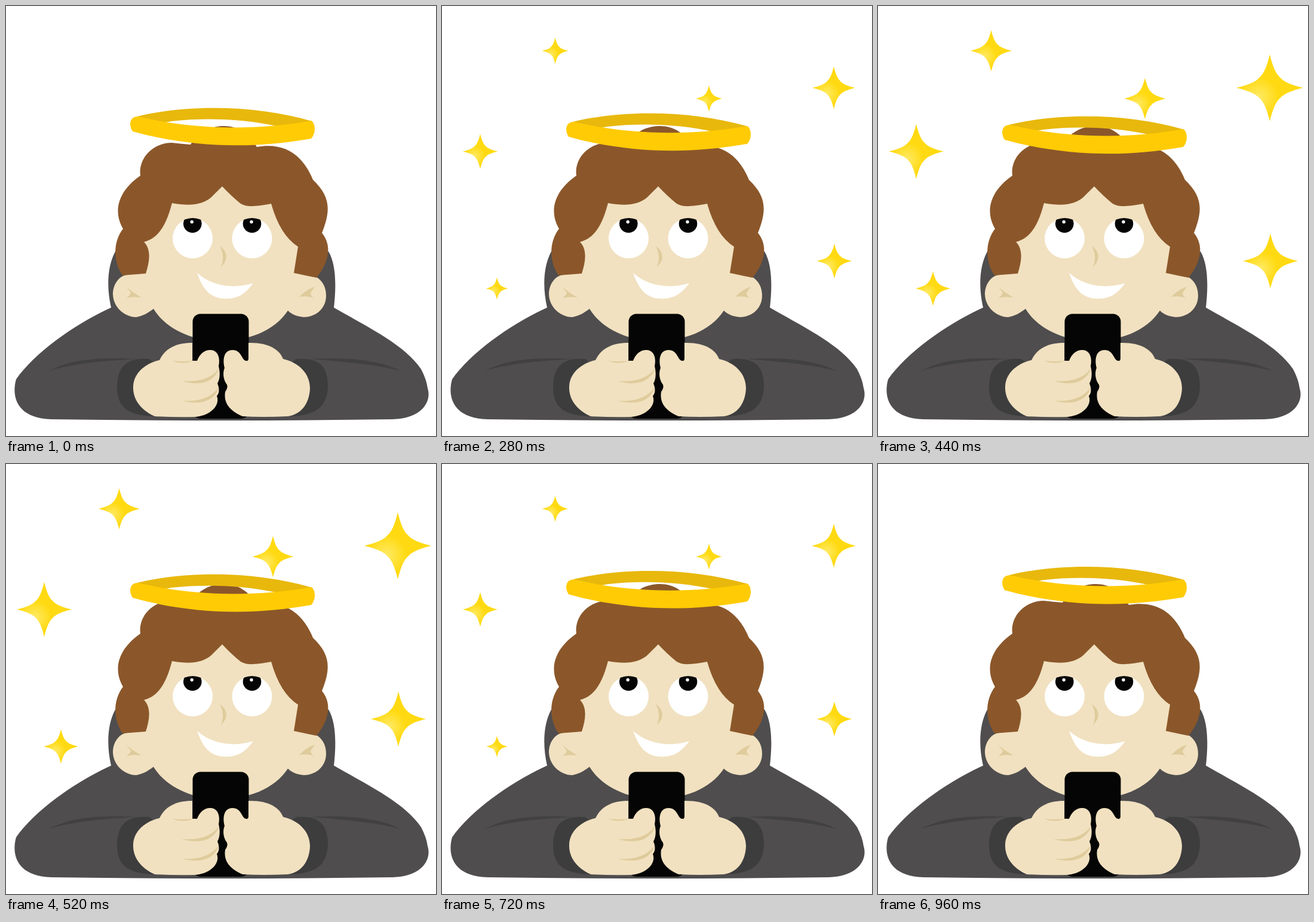
Animation, 720 px wide and 720 px high, one loop 1 s. Source, as an HTML page:

```html
<!DOCTYPE html>
<html lang="en">
<head>
<meta charset="utf-8">
<title>Halo</title>
<style>
  html, body { margin: 0; width: 100%; height: 100%; overflow: hidden; background: #fff; }
  svg { display: block; width: 100%; height: 100%; }
  .hair { fill: #8b572a; }
  .skin { fill: #f1e1c0; }
  .line { fill: #dfcb9b; }
  .coat { fill: #4f4d4e; }
  .fold { fill: #414141; }
  .cuff { fill: #3d3d3e; }
  .ink { fill: #050505; }
  .white { fill: #fff; }
</style>
</head>
<body>
<svg viewBox="0 0 720 720">
  <defs>
    <radialGradient id="gold" cx=".33" cy=".64" r=".3">
      <stop offset="0" stop-color="#ffea66"/>
      <stop offset="1" stop-color="#ffda12"/>
    </radialGradient>
    <clipPath id="lids">
      <circle cx="312.5" cy="389" r="34"/>
      <circle cx="412" cy="389" r="34"/>
    </clipPath>
  </defs>

  <path class="coat" d="M183 411C170 435 168 470 176 505C118 531 48 580 17 625C9 653 17 690 76 692Q360 696 647 692C697 691 713 662 706 640Q704 625 695 608C668 568 610 540 549 505C553 470 553 433 540 411Z"/>
  <path class="fold" d="M72 611C110 590 160 588 222 591C160 594 110 599 72 611ZM660 611C625 592 565 588 510 591C570 596 620 600 660 611Z"/>
  <path class="cuff" d="M240 591C200 588 186 605 186 640C187 670 201 686 250 687L300 640ZM486 591C527 588 539 606 539 638C537 670 522 685 476 687L420 640Z"/>

  <path class="skin" d="M231 395L203 450C189 452 179 466 179 483C180 506 200 521 218 521C231 519 240 512 247 507C268 542 315 561 358 561C404 561 449 545 472 510C479 517 488 520 499 521C522 520 536 504 536 485C536 472 531 461 520 454L489 403L444 320L362 290L278 320Z"/>
  <path class="line" d="M201 470Q212 480 227 488Q212 486 202 489Q209 483 209 480ZM517 470Q504 474 491 487Q504 485 515 489Q509 483 510 480Z"/>
  <path class="hair" d="M195 451C180 430 178 396 196 373C180 346 185 312 225 284C221 256 245 229 278 229Q295 231 309 232C322 211 342 201 365 201C388 201 407 213 420 236C468 228 497 250 514 291C542 318 545 340 529 380C547 402 540 430 520 455L482 447L489 403Q459 384 444 331C418 336 403 337 393 331Q378 319 362 302Q353 311 344 320C328 334 306 335 278 330C269 365 256 389 231 395C243 407 241 427 234 448Z"/>

  <circle class="white" cx="312.5" cy="389" r="33.5"/>
  <circle class="white" cx="412" cy="389" r="33.5"/>
  <g class="ink" clip-path="url(#lids)">
    <circle cx="312.3" cy="364.5" r="15.3"/>
    <circle cx="412" cy="364.5" r="15.3"/>
  </g>
  <circle class="white" cx="311.2" cy="361.5" r="2.7"/>
  <circle class="white" cx="411" cy="361.5" r="2.7"/>
  <path class="line" d="M358 402C373 413 371 427 360 437C365 424 364 414 358 402Z"/>
  <path class="white" d="M320 447C346 470 383 474 414 464C400 483 388 490 368 490C340 490 329 472 320 447Z"/>

  <rect class="ink" x="312.5" y="515.5" width="94" height="175.5" rx="13"/>
  <path class="skin" d="M257 593C268 570 290 564 312 564V594H320C324 583 332 575.5 343 576C355 577 359 589 356 603C359 615 358 625 354 632C358 641 357 649 353 653C359 668 343 686 317 688Q283 689 249 687C224 676 212 657 213 637C214 614 234 598 257 593Z"/>
  <path class="skin" d="M406 564C439 563 458 575 464 591C490 597 509 615 509 640C508 666 494 684 472 687Q430 689 396 687C375 678 364 665 367 646Q372 639 370 634C363 625 363 613 366 606C362 590 366 576 379 576C395 576 394 593 402 594Q406 595 406 590Z"/>
  <path class="line" d="M277 594Q295 596 314 594Q296 601 277 594ZM357 606C348 632 322 636 294 628C323 630 344 624 357 606ZM356 639C348 664 323 668 294 661C323 663 343 656 356 639Z"/>

  <g id="stars" fill="url(#gold)"></g>
  <g id="halo">
    <path fill="#e8b80c" d="M219 185C310 163 425 167 513 193L457 202C400 189 335 186.5 277 193L250 198Z"/>
    <path fill="#ffcb05" d="M221 185C310 206 410 210 511 192Q517 195 517 207Q516 217 511 222C410 240 310 237 212 210Q208 204 208 197Q209 185 221 185Z"/>
  </g>
</svg>
<script>
  const LOOP = 1000, STEP = 40, TOP = 480;
  // x, y, half size, lag while shrinking
  const stars = [
    [189.5, 75, 34.5, 0], [656, 137, 56, 14], [447, 155, 34.5, 0],
    [64, 243.5, 46, 2], [657, 427, 46, 3], [92, 473, 29, -6]
  ];
  const fall = [[480, 1.01], [520, 1], [560, .962], [600, .9], [700, .675], [800, .435], [880, .215], [960, 0]];
  const quarter = "Q.13 -.45 .31 -.31Q.45 -.13 1 0Q.45 .13 .31 .31Q.13 .45 0 1";
  const back = "Q-.13 .45 -.31 .31Q-.45 .13 -1 0Q-.45 -.13 -.31 -.31Q-.13 -.45 0 -1Z";

  const halo = document.getElementById("halo");
  const shapes = stars.map(() => {
    const p = document.createElementNS("http://www.w3.org/2000/svg", "path");
    p.setAttribute("d", "M0 -1" + quarter + back);
    document.getElementById("stars").append(p);
    return p;
  });

  function size(t, lag) {
    if (t >= 960) return 0;
    if (t <= TOP) {
      const u = t / TOP;
      return 1.02 * u * u * (3 - 2 * u);
    }
    const s = Math.min(960, Math.max(TOP, t - lag));
    const i = Math.max(1, fall.findIndex(k => k[0] >= s));
    const [a, va] = fall[i - 1], [b, vb] = fall[i];
    return va + (vb - va) * (s - a) / (b - a);
  }

  function draw(now) {
    const t = Math.floor(now % LOOP / STEP) * STEP;
    const dy = 15.3 * Math.min(t / TOP, (LOOP - t) / (LOOP - TOP));
    halo.setAttribute("transform", `translate(0 ${dy})`);
    stars.forEach(([x, y, r, lag], i) => {
      const k = r * size(t, lag);
      shapes[i].style.display = k > 0 ? "" : "none";
      shapes[i].setAttribute("transform", `translate(${x} ${y}) scale(${k})`);
    });
  }

  const start = performance.now();
  function tick() {
    draw(performance.now() - start);
    requestAnimationFrame(tick);
  }
  tick();
</script>
</body>
</html>
```
